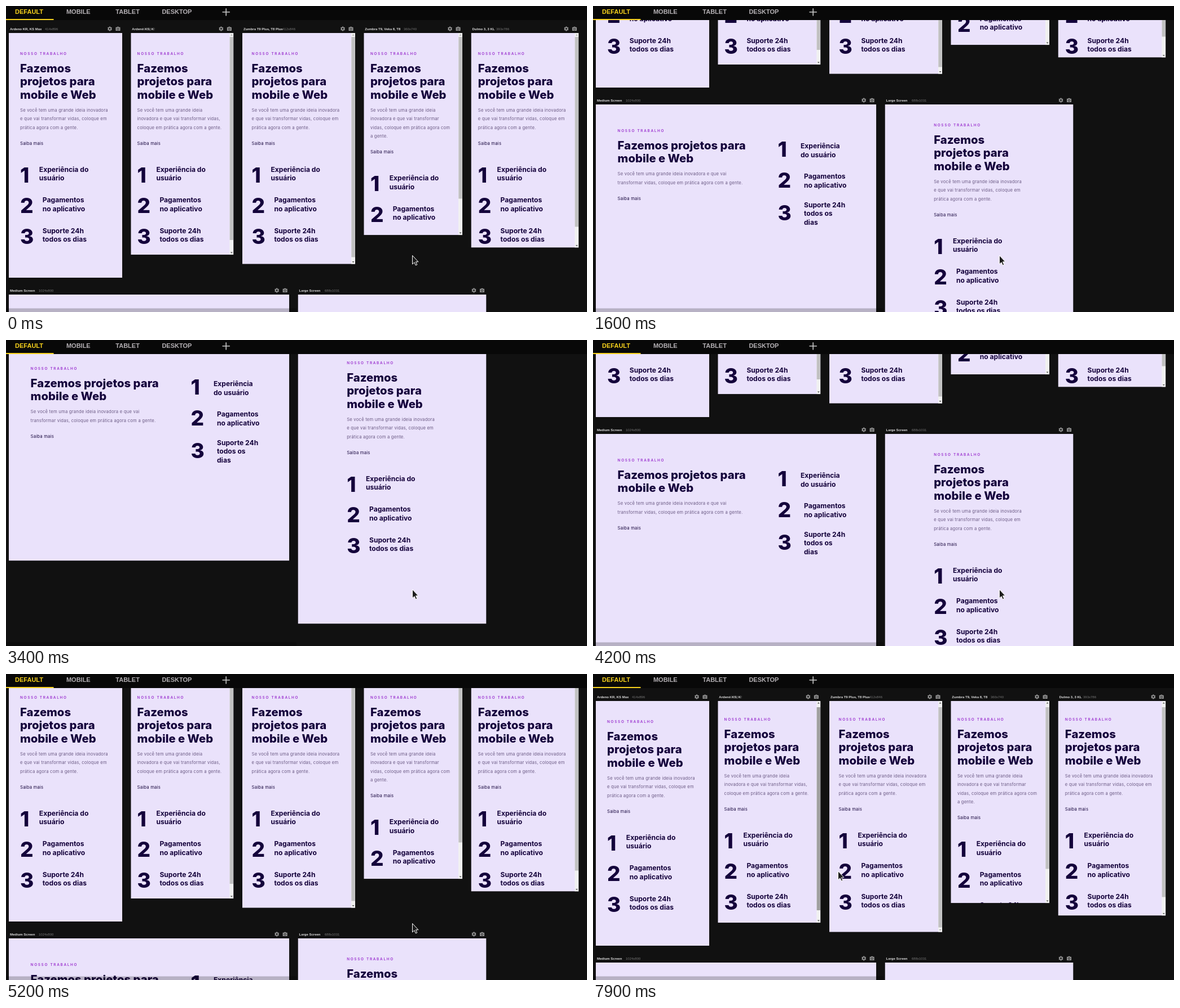
An HTML page for the animation above (8000 ms loop, 1030 by 544 pixels).

```html
<!DOCTYPE html>
<html lang="pt">
<head>
<meta charset="utf-8">
<title>Responsive preview</title>
<style>
html, body { margin: 0; width: 100%; height: 100%; overflow: hidden; background: #111; }
svg { display: block; }
text { font-family: Inter, sans-serif; white-space: pre; }
.tab { font: bold 11px "Liberation Sans", sans-serif; fill: #b4b0b4; text-anchor: middle; }
.tab.on { fill: #f8d21c; }
.name { font: bold 6px "Liberation Sans", sans-serif; fill: #dcdcdc; }
.size { font: 6px "Liberation Sans", sans-serif; fill: #777; }
.kicker { font-size: 6.4px; font-weight: 600; letter-spacing: 1.7px; fill: #9b33cf; }
.title { font-size: 20.3px; font-weight: 800; fill: #14023b; }
.body { font-size: 7.7px; letter-spacing: .2px; fill: #6d5c86; }
.link { font-size: 7.7px; letter-spacing: .2px; fill: #1b0a40; }
.digit { font-size: 37px; font-weight: 800; fill: #14023b; }
.item { font-size: 12.1px; font-weight: 700; fill: #14023b; }
</style>
</head>
<body>
<svg id="stage" width="1030" height="544" viewBox="0 0 1030 544"></svg>
<script>
const stage = document.getElementById('stage');

function add(parent, tag, attrs, text) {
  const el = document.createElementNS('http://www.w3.org/2000/svg', tag);
  for (const k in attrs) el.setAttribute(k, attrs[k]);
  if (text) el.textContent = text;
  parent.append(el);
  return el;
}
const rect = (p, x, y, width, height, fill) => add(p, 'rect', { x, y, width, height, fill });
const path = (p, d, fill, more) => add(p, 'path', { d, fill, ...more });
const write = (p, cls, x, y, text) => add(p, 'text', { class: cls, x, y }, text);
const move = (el, x, y) => el.setAttribute('transform', `translate(${x} ${y})`);

const SCALE = 0.4855;
const TITLE = ['Fazemos', 'projetos para', 'mobile e Web'];
const WIDE_TITLE = ['Fazemos projetos para', 'mobile e Web'];
const ITEMS = [['Experiência do', 'usuário'], ['Pagamentos', 'no aplicativo'], ['Suporte 24h', 'todos os dias']];
const WIDE_ITEMS = [['Experiência', 'do usuário'], ['Pagamentos', 'no aplicativo'], ['Suporte 24h', 'todos os', 'dias']];
const BODY = ['Se você tem uma grande ideia inovadora', 'e que vai transformar vidas, coloque em', 'prática agora com a gente.'];
const BODY_375 = ['Se você tem uma grande ideia', 'inovadora e que vai transformar vidas,', 'coloque em prática agora com a gente.'];
const BODY_360 = ['Se você tem uma grande ideia', 'inovadora e que vai transformar', 'vidas, coloque em prática agora com', 'a gente.'];
const BODY_1024 = ['Se você tem uma grande ideia inovadora e que vai', 'transformar vidas, coloque em prática agora com a gente.'];

// thumb: length of the scroll thumb; pad: left inset of the content
const screens = [
  { name: 'Ardeno KR, KS Max', w: 414, h: 896, x: 5, y: 48, sizeX: 69, pad: 20, body: BODY },
  { name: 'Ardeno KS, K', w: 375, h: 812, x: 221.3, y: 48, sizeX: 241, pad: 11.3, body: BODY_375, thumb: 361 },
  { name: 'Zumbra T9 Plus, T8 Plus', w: 412, h: 846, x: 419, y: 48, sizeX: 490, pad: 16.6, body: BODY, thumb: 391.5 },
  { name: 'Zumbra T9, Veka 8, T8', w: 360, h: 740, x: 634.3, y: 48, sizeX: 705, pad: 11.6, body: BODY_360, thumb: 287.5 },
  { name: 'Dulmo 3, 3 KL', w: 393, h: 786, x: 824.5, y: 48, sizeX: 869, pad: 12.3, body: BODY, thumb: 337.5 },
  { name: 'Medium Screen', w: 1024, h: 800, x: 5, y: 513, sizeX: 58, pad: 38.6, body: BODY_1024, wide: true },
  { name: 'Large Screen', w: 688, h: 1031, x: 517.5, y: 513, sizeX: 565, pad: 86.7, body: BODY }
];

function drawContent(view, s) {
  const g = add(view, 'g', {});
  let y = s.wide ? 48.5 : 38.5;
  write(g, 'kicker', s.pad, y, 'NOSSO TRABALHO');
  y += 31.6;
  for (const line of s.wide ? WIDE_TITLE : TITLE) {
    write(g, 'title', s.pad, y, line);
    y += 23.3;
  }
  y -= .4;
  for (const line of s.body) {
    write(g, 'body', s.pad, y, line);
    y += 15.6;
  }
  write(g, 'link', s.pad, y + 12.4, 'Saiba mais');

  const left = s.wide ? 322.5 : s.pad;
  const gap = s.wide ? 40.5 : 33.8;
  let top = s.wide ? 78 : y + 60.4;
  (s.wide ? WIDE_ITEMS : ITEMS).forEach((lines, i) => {
    const extra = (lines.length - 2) * 7.8;
    if (extra) top -= 4;
    write(g, 'digit', left, top + extra + (s.wide ? 15.2 : 19), String(i + 1));
    lines.forEach((line, n) => write(g, 'item', left + gap + (i ? 6 : 0), top + n * 15.6, line));
    top += 54.4;
  });
  return g;
}

function drawScrollbar(view, s, w, h) {
  const x = w - 7, mid = w - 3.5;
  rect(view, x, 0, 7, h, '#f1f1f1');
  s.bar = rect(view, x + .3, 7, 6.4, s.thumb, '#c1c1c1');
  s.up = path(view, `M${mid - 2} 4.5h4l-2 -2.2z`, '#a3a3a3');
  s.down = path(view, `M${mid - 2} ${h - 4.7}h4l-2 2.2z`, '#505050');
}

function drawIcons(p, right, y) {
  const gear = add(p, 'g', { transform: `translate(${right - 22} ${y})` });
  for (let a = 0; a < 180; a += 60)
    add(gear, 'rect', { x: -1.1, y: -4, width: 2.2, height: 8, fill: '#929292', transform: `rotate(${a})` });
  add(gear, 'circle', { r: 2.2, fill: '#111', stroke: '#929292', 'stroke-width': 1.6 });
  const cam = add(p, 'g', { transform: `translate(${right - 7.5} ${y})` });
  path(cam, 'M-4 -2.7h2l1 -1.1h2l1 1.1h2v6.2h-8z', '#929292');
  add(cam, 'circle', { cy: .4, r: 1.7, fill: '#929292', stroke: '#111', 'stroke-width': .8 });
}

const page = add(stage, 'g', {});
for (const s of screens) {
  const w = s.w * SCALE, h = s.h * SCALE;
  write(page, 'name', s.x + 2, s.y - 5, s.name);
  write(page, 'size', s.sizeX, s.y - 5, `${s.w}x${s.h}`);
  drawIcons(page, s.x + w, s.y - 7.5);
  const view = add(page, 'svg', { x: s.x, y: s.y, width: w, height: h, overflow: 'hidden' });
  rect(view, 0, 0, w, h, '#eae2fb');
  s.content = drawContent(view, s);
  if (s.thumb) drawScrollbar(view, s, w, h);
}

add(stage, 'rect', { x: 0, y: 537.5, width: 515, height: 6.5, fill: '#000', opacity: .22 });
rect(stage, 0, 0, 1030, 25, '#080808');
rect(stage, 0, 23, 84.5, 2, '#f8d21c');
['DEFAULT', 'MOBILE', 'TABLET', 'DESKTOP'].forEach((t, i) =>
  write(stage, i ? 'tab' : 'tab on', 41 + i * 87.3, 14, t));
path(stage, 'M383.5 10.8h13.4M390.2 4.2v13.4', 'none', { stroke: '#c8c8c8', 'stroke-width': 1.6 });
const cursor = path(stage, 'M.5 .5V16L4 12.8 6.3 18 8.8 16.9 6.5 11.8H11Z', '#1c1c1c', { stroke: '#fff', 'stroke-width': 1 });

// Linear interpolation through [time, value] keys
function at(keys, t) {
  let i = keys.findIndex(k => k[0] > t);
  if (i < 0) return keys[keys.length - 1][1];
  if (!i) return keys[0][1];
  const [t0, a] = keys[i - 1], [t1, b] = keys[i];
  return a + (b - a) * (t - t0) / (t1 - t0);
}

const SCROLL = [[400, 0], [500, 8], [600, 32], [800, 98], [1600, 338], [2000, 446], [2300, 502], [2400, 509],
  [2600, 509], [2700, 510], [3300, 510], [3400, 509], [3500, 501], [3700, 466], [4200, 346], [5100, 78],
  [5200, 43], [5300, 1], [5500, 1], [5600, 0]];
const INNER = [[7100, 0], [7300, 4]];
const CURSOR_X = [[6100, 720], [6200, 702], [6500, 506], [6600, 492], [7700, 492], [7900, 434]];
const CURSOR_Y = [[6100, 443], [6200, 435], [6500, 351], [6600, 346], [7700, 346], [7900, 350]];

function draw(now) {
  const t = Math.floor(now % 8000 / 100) * 100;
  move(page, 0, -Math.round(at(SCROLL, t)));
  const inner = at(INNER, t);
  for (const s of screens) if (s.thumb) {
    move(s.content, 0, -inner);
    move(s.bar, 0, inner);
    s.up.setAttribute('fill', inner ? '#505050' : '#a3a3a3');
  }
  screens[1].bar.setAttribute('fill', t >= 7800 ? '#a0a0a0' : '#c1c1c1');
  screens[2].down.setAttribute('fill', inner === 4 ? '#a3a3a3' : '#505050');
  move(cursor, at(CURSOR_X, t), at(CURSOR_Y, t));
}

const start = performance.now();
function tick() {
  draw(performance.now() - start);
  requestAnimationFrame(tick);
}
tick();
</script>
</body>
</html>
```
